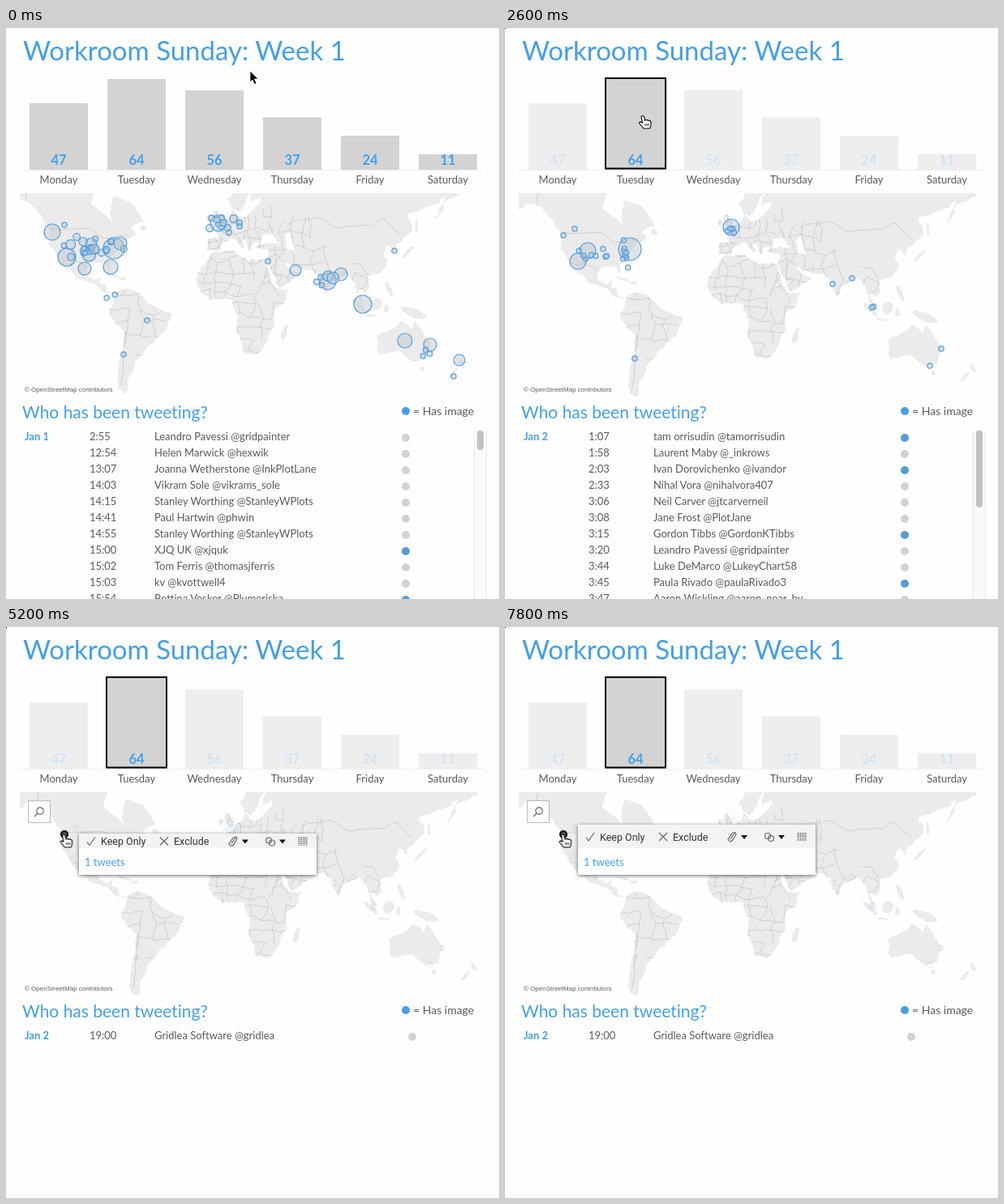
Recreate the animation shown at these times as an HTML page. Size 608x705 px, loop 8000 ms.

```html
<!DOCTYPE html>
<html lang="en">
<head>
<meta charset="utf-8">
<title>Weekly tweets dashboard</title>
<style>
html, body { margin: 0; width: 100%; height: 100%; overflow: hidden; background: #fefefe; }
svg { display: block; width: 608px; height: 705px; font: 13px Lato, sans-serif; font-variant-ligatures: none; fill: #5a5a5e; }
svg * { animation-duration: 8s; animation-iteration-count: infinite; animation-timing-function: step-end; }
.title { font-size: 33px; }
.subtitle { font-size: 21px; }
.blue { fill: #429fe9; }
.bold { font-weight: bold; }
.mid { text-anchor: middle; }
.bar { fill: #d3d3d3; }
.count { font-size: 16.5px; }
.bar.other { animation-name: dimBar; }
.count.other { animation-name: dimCount; }
.land { fill: #ebebeb; }
.border { fill: none; stroke: #c8c8c8; stroke-width: .8; }
.mark { fill: #bcc3ca; fill-opacity: .45; stroke: #4c9fe2; stroke-width: 1.2; }
.thumb { fill: #c2c2c2; }
.map { animation-name: pan; }
.first { animation-name: first; }
.second { animation-name: second; }
.secondMarks { animation-name: secondMarks; }
.filtered { animation-name: filtered; }
.selected { animation-name: selected; }
.hovered { animation-name: hovered; }
.clicked { animation-name: clicked; }
.single { animation-name: single; }
.scroll { animation-name: scroll; }
.tip { filter: drop-shadow(0 1px 2px #0009); }
.tools { animation-name: tools; }
.icons { animation-name: icons; font: 12.5px Roboto, sans-serif; fill: #333; }
.line { fill: none; stroke: #666; stroke-width: 1.2; }
.cursor { animation-name: move; }
.arrow { animation-name: arrow; }
.hand { animation-name: hand; }
@keyframes dimBar { 15%, 100% { fill: #eeeeef; } }
@keyframes dimCount { 15%, 100% { fill: #d2e4f4; } }
@keyframes pan { 0% { transform: none; } 25%, 100% { transform: translate(15px, 5px); } }
@keyframes first { 0% { opacity: 1; } 25%, 100% { opacity: 0; } }
@keyframes second { 0% { opacity: 0; } 25% { opacity: 1; } 62.5%, 100% { opacity: 0; } }
@keyframes secondMarks { 0% { opacity: 0; } 25% { opacity: 1; } 57.5%, 100% { opacity: .15; } }
@keyframes filtered { 0% { opacity: 0; } 25%, 100% { opacity: 1; } }
@keyframes selected { 0% { opacity: 0; } 15%, 100% { opacity: 1; } }
@keyframes hovered { 0% { opacity: 0; } 50%, 100% { opacity: 1; } }
@keyframes clicked { 0% { opacity: 0; } 57.5%, 100% { opacity: 1; } }
@keyframes single { 0% { opacity: 0; } 62.5%, 100% { opacity: 1; } }
@keyframes scroll { 0% { opacity: 1; } 62.5%, 100% { opacity: 0; } }
@keyframes tools { 0% { transform: translateY(30px); } 65% { transform: translateY(11px); } 67.5%, 100% { transform: none; } }
@keyframes icons { 0% { opacity: 0; transform: translateY(15px); } 65% { opacity: 1; transform: translateY(5.5px); } 67.5%, 100% { opacity: 1; transform: none; } }
@keyframes arrow { 0% { opacity: 1; } 12.5%, 100% { opacity: 0; } }
@keyframes hand { 0% { opacity: 0; } 12.5%, 100% { opacity: 1; } }
@keyframes move {
  0% { transform: translate(301px, 53px); }
  2.5% { transform: translate(301px, 53px); animation-timing-function: steps(4); }
  12.5% { transform: translate(170px, 108px); }
  37.5% { transform: translate(170px, 108px); animation-timing-function: steps(4); }
  47.5% { transform: translate(100px, 247px); animation-timing-function: steps(3); }
  55%, 100% { transform: translate(71.5px, 256px); }
}
</style>
</head>
<body>
<svg viewBox="0 0 608 705">
  <clipPath id="frame"><path d="M17 204H593V455H17Z"/></clipPath>
  <clipPath id="coast"></clipPath>
  <path class="filtered" d="M0 0H1V1H0Z" fill="#000"/>
  <text class="title blue" x="21" y="40">Workroom Sunday: Week 1</text>
  <path d="M17 175.5H590" stroke="#eee"/>
  <g id="bars"></g>
  <rect class="selected" x="124" y="62" width="74" height="111.5" fill="none" stroke="#000" stroke-width="2"/>
  <g clip-path="url(#frame)">
    <g class="map">
      <g id="land"></g>
      <g id="borders" clip-path="url(#coast)"></g>
    </g>
    <path class="filtered" d="M581 204H593V455H581Z" fill="#fefefe"/>
    <g class="first" id="allMarks"></g>
    <g class="secondMarks" id="dayMarks"></g>
  </g>
  <text x="23" y="449" style="font:8px 'Liberation Sans',sans-serif">© OpenStreetMap contributors</text>
  <text class="subtitle blue" x="20" y="482">Who has been tweeting?</text>
  <circle class="blue" cx="493" cy="473" r="5"/>
  <text x="502" y="478" font-size="14">= Has image</text>
  <g class="first" id="rows1"></g>
  <g class="second" id="rows2"></g>
  <g class="single" id="rows3"></g>
  <g class="scroll">
    <path d="M577 497H593V705H577Z" fill="#fafafa"/>
    <path d="M577.5 497V705M592.5 497V705" stroke="#e6e6ea"/>
    <rect class="thumb" x="581" y="497" width="8" height="24" rx="4"/>
    <rect class="thumb selected" x="581" y="497" width="8" height="95" rx="4"/>
  </g>
  <g class="hovered">
    <rect x="27.5" y="214.5" width="27" height="27" fill="#fefefe" stroke="#bbb"/>
    <path class="line" d="M39 230L35 234"/><circle class="line" cx="42" cy="227" r="4.2"/>
  </g>
  <g class="clicked">
    <circle cx="72" cy="256" r="4" fill="#456" stroke="#000" stroke-width="2"/>
    <g class="tip">
      <path class="tools" d="M90 244H383V274H90Z" fill="#f3f3f3"/>
      <path d="M90 273H383V306H90Z" fill="#fefefe"/>
    </g>
    <text class="blue" x="97" y="295">1 tweets</text>
    <g class="icons">
      <path class="line" d="M100 260L103 264L110 254M190 254L200 264M200 254L190 264"/>
      <text x="117" y="263.5">Keep Only</text>
      <text x="207" y="263.5">Exclude</text>
      <path class="line" d="M278 262L282 256Q284 253 285 256L281 263Q277 267 275 262L280 255Q283 252 285 255"/>
      <circle class="line" cx="324" cy="258" r="3.5"/><circle class="line" cx="328" cy="261" r="3.5"/>
      <path d="M291 257H299L295 262ZM337 257H345L341 262Z" fill="#111"/>
      <path d="M361.5 254V264M364.5 254V264M367.5 254V264M370.5 254V264" stroke="#777" stroke-width="2" stroke-dasharray="1.5 .8"/>
    </g>
  </g>
  <g class="cursor">
    <path class="arrow" d="M0 0V14L3 11L5.5 16.5L8 15.5L5.5 10H10Z" fill="#000" stroke="#fff" stroke-width=".8"/>
    <g class="hand" stroke="#000" stroke-width="1.1">
      <path d="M-2 1.5Q0-1 1.5 1.5L2.5 6Q3.5 4.5 4.8 6Q6.3 5 7.5 6.5Q9.5 6 10 8V11Q10 14 8.5 16H1Q-2 12.5-4.5 9.5Q-4 7-.5 9Z" fill="#fff"/>
      <path d="M3 10V13M5 10V13M7 10V13" fill="none" stroke-width=".8"/>
    </g>
  </g>
</svg>
<script>
const byId = id => document.getElementById(id);
function add(parent, tag, attrs, text = "") {
  const node = document.createElementNS("http://www.w3.org/2000/svg", tag);
  for (const key in attrs) node.setAttribute(key, attrs[key]);
  node.textContent = text;
  return parent.appendChild(node);
}
let seed = 7;
const random = () => (seed = seed * 16807 % 2147483647) / 2147483647;
const spread = size => (random() + random() - 1) * size;

const days = { Monday: 47, Tuesday: 64, Wednesday: 56, Thursday: 37, Friday: 24, Saturday: 11 };
Object.entries(days).forEach(([day, count], i) => {
  const x = 65 + 96 * i, height = count * 1.75;
  const state = day === "Tuesday" ? "" : " other";
  add(byId("bars"), "rect", { class: "bar" + state, x: x - 36, y: 175 - height, width: 72, height });
  add(byId("bars"), "text", { class: "count blue bold mid" + state, x, y: 168.5 }, count);
  add(byId("bars"), "text", { class: "mid", x, y: 192 }, day);
  add(byId("bars"), "path", { d: `M${x + 48.5} 176V180`, stroke: "#f0f0f0" });
});

// Map positions are longitude and latitude in Mercator projection.
const project = ([lon, lat]) =>
  [264 + 1.694 * lon, 342.6 - 97.06 * Math.log(Math.tan(Math.PI / 4 + lat * Math.PI / 360))];
const parse = list => list.split(",").map(pair => project(pair.split(" ").map(Number)));
function roughen(points, depth) {
  if (!depth) return points;
  const finer = points.flatMap((p, i) => {
    const q = points[i + 1];
    if (!q) return [p];
    const dx = q[0] - p[0], dy = q[1] - p[1];
    const k = (random() - .5) * Math.min(.3, 4 / (Math.hypot(dx, dy) + .1));
    return [p, [p[0] + dx / 2 - dy * k, p[1] + dy / 2 + dx * k]];
  });
  return roughen(finer, depth - 1);
}
const toPath = points => "M" + points.map(p => p.map(v => v.toFixed(1)).join(" ")).join("L");
function land(points, depth = 3) {
  const d = toPath(roughen([...points, points[0]], depth));
  add(byId("land"), "path", { class: "land", d });
  add(byId("coast"), "path", { d });
}
const border = points => add(byId("borders"), "path", { class: "border", d: toPath(roughen(points, 2)) });

// Key points of each coast; the detail between them is random.
const coasts = {
  northAmerica: "-168 66,-157 58,-150 61,-140 60,-131 55,-124 48,-124 40,-117 32,-106 29,-97 26,-94 30,-84 30,-81 25,-81 31,-76 36,-70 42,-61 46,-65 49,-56 52,-65 60,-78 62,-79 52,-94 59,-88 66,-168 70",
  centralAmerica: "-117 32,-110 23,-113 31,-105 20,-94 16,-84 9,-77 8,-83 11,-83 15,-88 16,-87 21,-91 18,-97 21,-97 26,-106 32",
  southAmerica: "-77 8,-72 12,-62 11,-50 0,-35 -6,-39 -17,-48 -26,-58 -35,-62 -39,-66 -46,-69 -54,-74 -52,-73 -37,-70 -18,-76 -14,-81 -5,-77 4",
  africa: "-6 36,10 37,20 31,34 31,39 15,43 12,51 12,48 4,39 -5,40 -15,35 -21,32 -29,25 -34,18 -33,12 -17,13 -9,9 0,9 4,-8 4,-17 14,-17 21,-10 30",
  europe: "-9 43,-9 37,-2 37,3 42,9 44,16 38,18 40,13 45,19 42,22 37,24 41,29 41,31 46,38 46,42 42,48 42,47 45,51 47,60 50,60 70,30 70,29 60,21 55,14 54,9 57,8 54,-4 48,-1 44",
  scandinavia: "14 66,5 61,8 58,13 56,19 60,25 65,22 60,31 62,32 70,20 70",
  westAsia: "26 39,36 37,35 28,43 13,59 22,52 25,48 30,57 26,67 25,73 20,77 8,80 15,91 22,95 30,95 70,50 70,50 47,54 37,49 38,48 42,41 41,29 41",
  eastAsia: "90 23,98 16,100 6,104 1,100 13,105 9,109 12,107 21,117 23,122 30,119 35,122 40,127 34,129 41,140 48,136 55,155 59,164 62,156 51,163 60,180 64,194 66,194 70,88 70",
  australia: "114 -22,116 -34,131 -31,140 -38,150 -37,153 -26,145 -15,142 -11,139 -17,132 -11,122 -18",
};
Object.values(coasts).forEach(coast => land(parse(coast)));

// Islands are tilted ellipses.
function island(lon, lat, width, height, tilt = 0) {
  const [x, y] = project([lon, lat]), c = Math.cos(tilt), s = Math.sin(tilt);
  land(Array.from({ length: 8 }, (_, i) => {
    const u = width * Math.cos(i * Math.PI / 4), v = height * Math.sin(i * Math.PI / 4);
    return [x + u * c - v * s, y + u * s + v * c];
  }), 2);
}
island(-2.5, 54, 4, 10, -.3);    // Britain
island(-8, 53.3, 3, 4);          // Ireland
island(-18, 65, 8, 3);           // Iceland
island(-56, 49, 4, 4);           // Newfoundland
island(-79, 21.7, 9, 1.5, .3);   // Cuba
island(-71, 19, 5, 2);           // Hispaniola
island(46.8, -19, 3.5, 11, .3);  // Madagascar
island(101, 0, 13, 3, .8);       // Sumatra
island(110, -7.3, 8, 1.5, .1);   // Java
island(114, 1, 7, 8, .5);        // Borneo
island(121, -2, 3, 6);           // Sulawesi
island(141, -5.3, 17, 5, .4);    // New Guinea
island(123, 12, 3, 11, -.4);     // Philippines
island(137, 36.5, 11, 2.5, -.8); // Honshu
island(143, 50, 1.5, 9);         // Sakhalin
island(147, -42, 3, 3);          // Tasmania
island(176, -39, 3, 6, -.5);     // New Zealand
island(170, -44, 2.5, 8, .7);

// Small countries are cells of a shaken grid, clipped to the coasts.
function countries(west, south, east, north, cell) {
  const columns = Math.ceil((east - west) / cell), lines = Math.ceil((north - south) / cell);
  const nodes = Array.from({ length: columns + 1 }, (_, i) => Array.from({ length: lines + 1 }, (_, j) =>
    project([west + i * cell + spread(cell * .6), south + j * cell + spread(cell * .6)])));
  for (let i = 0; i < columns; i++) for (let j = 0; j < lines; j++) {
    if (random() < .7) border([nodes[i][j], nodes[i + 1][j]]);
    if (random() < .7) border([nodes[i][j], nodes[i][j + 1]]);
  }
}
countries(-18, -32, 44, 33, 8);
countries(-8, 38, 40, 58, 5);
countries(36, 14, 74, 50, 8);
countries(78, 10, 110, 34, 9);
countries(-79, -32, -48, 10, 10);
["-124 49,-95 49,-83 44,-75 45,-67 46", "-117 32,-106 32,-97 26", "-141 60,-141 70",
  "50 51,70 54,87 49,110 50,120 53,131 46", "-69 -18,-70 -33,-72 -50"].forEach(line => border(parse(line)));

const mark = (id, cx, cy, r = 3.2) => add(byId(id), "circle", { class: "mark", cx, cy, r });
const marks = (id, list) => list.split(",").forEach(item => mark(id, ...item.split(" ")));
function scatter(id, x, y, width, height, count, largest = 3.2) {
  for (let i = 0; i < count; i++)
    mark(id, x + spread(width), y + spread(height), 3.2 + (largest - 3.2) * random() ** 2);
}
// Prominent marks as "x y radius", then clusters of small ones.
marks("allMarks", "57 252 10,75 283 11,133 272 13,141 266 8,129 295 9,97 297 8,262 241 10,357 299 7,397 313 10,413 304 8,440 341 11,492 386 9,523 391 8,559 410 7");
marks("allMarks", "145 403,174 361,323 288,479 275,552 430,72 243");
scatter("allMarks", 103, 272, 46, 15, 26, 8);
scatter("allMarks", 130, 330, 10, 5, 2);
scatter("allMarks", 269, 242, 28, 13, 12, 7);
scatter("allMarks", 393, 309, 14, 14, 5, 8);
scatter("allMarks", 516, 404, 9, 8, 3);
marks("dayMarks", "102 275 10,90 288 10,154 273 14,279 246 10,72 256,86 248,160 408,404 316,428 309,538 396,524 417");
scatter("dayMarks", 102, 278, 30, 14, 8);
scatter("dayMarks", 147, 279, 11, 20, 8);
scatter("dayMarks", 283, 250, 12, 6, 5);
scatter("dayMarks", 452, 345, 3, 2, 2);

// A leading asterisk means that the tweet has an image.
function rows(id, date, list, dotX = 493) {
  const group = byId(id);
  add(group, "text", { class: "blue bold", x: 23, y: 509 }, date);
  list.forEach((entry, i) => {
    const [time, ...name] = entry.replace("*", "").split(" ");
    const y = 509 + 20 * i;
    add(group, "text", { x: 103, y }, time);
    add(group, "text", { x: 183, y }, name.join(" "));
    add(group, "circle", { cx: dotX, cy: y - 3, r: 5, fill: entry[0] === "*" ? "#559dd2" : "#d2d2d2" });
  });
}
rows("rows1", "Jan 1", [
  "2:55 Leandro Pavessi @gridpainter", "12:54 Helen Marwick @hexwik", "13:07 Joanna Wetherstone @InkPlotLane",
  "14:03 Vikram Sole @vikrams_sole", "14:15 Stanley Worthing @StanleyWPlots", "14:41 Paul Hartwin @phwin",
  "14:55 Stanley Worthing @StanleyWPlots", "*15:00 XJQ UK @xjquk", "15:02 Tom Ferris @thomasjferris",
  "15:03 kv @kvottwell4", "*15:54 Bettina Vosker @Plumeriska"]);
rows("rows2", "Jan 2", [
  "*1:07 tam orrisudin @tamorrisudin", "1:58 Laurent Maby @_inkrows", "*2:03 Ivan Dorovichenko @ivandor",
  "2:33 Nihal Vora @nihalvora407", "3:06 Neil Carver @jtcarverneil", "3:08 Jane Frost @PlotJane",
  "*3:15 Gordon Tibbs @GordonKTibbs", "3:20 Leandro Pavessi @gridpainter", "3:44 Luke DeMarco @LukeyChart58",
  "*3:45 Paula Rivado @paulaRivado3", "3:47 Aaron Wickling @aaron_near_by"]);
rows("rows3", "Jan 2", ["19:00 Gridlea Software @gridlea"], 501);
</script>
</body>
</html>
```
